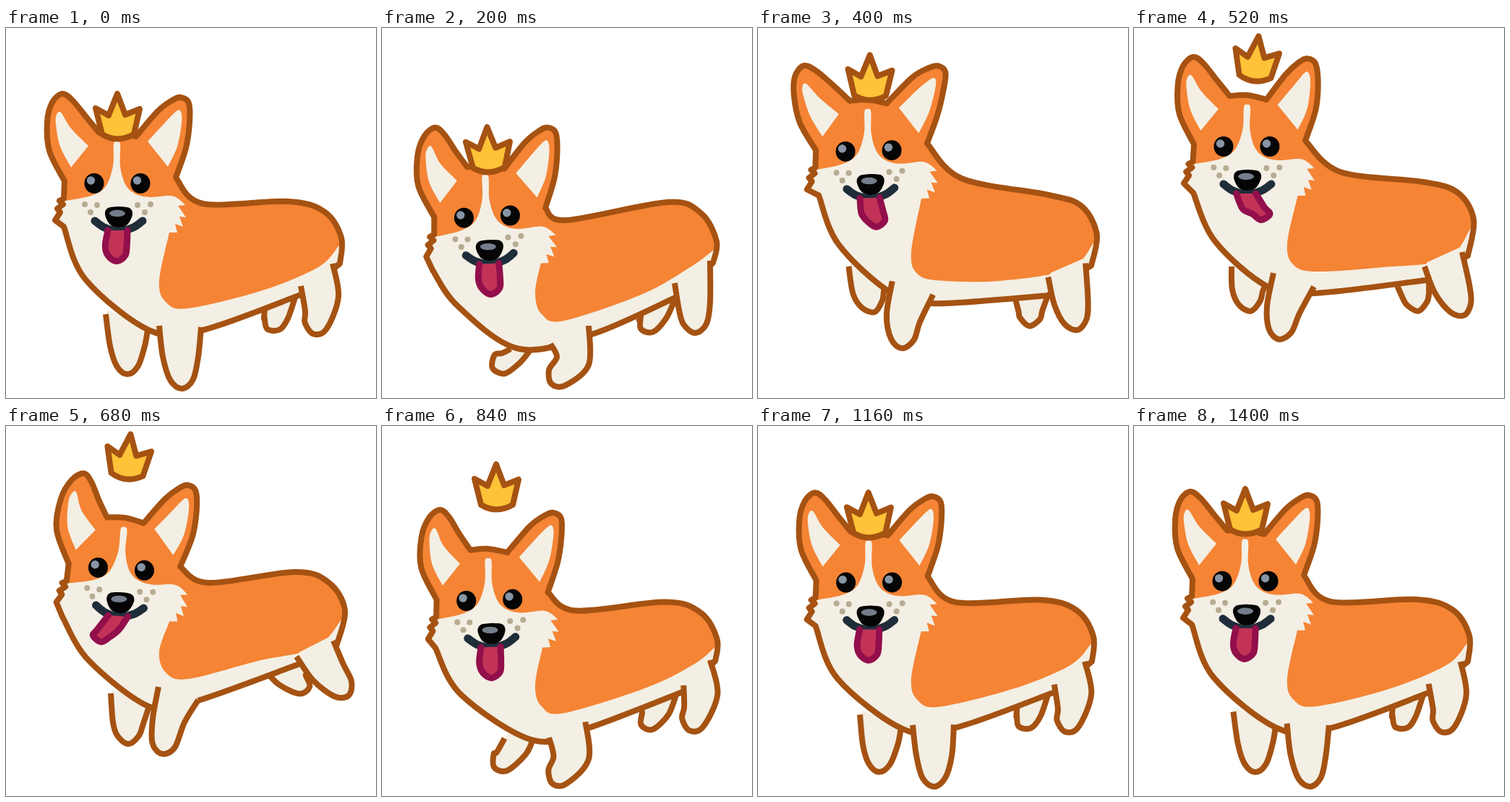
Write an HTML page with a canvas that moves like this. It is 512 px wide and 512 px high and loops after 1.44 s.

```html
<!DOCTYPE html>
<html lang="en">
<head>
<meta charset="utf-8">
<title>Jumping corgi</title>
<style>
html, body { margin: 0; width: 100%; height: 100%; overflow: hidden; background: #fff; }
canvas { display: block; width: 100vw; height: 100vh; }
</style>
</head>
<body>
<canvas id="stage" width="512" height="512"></canvas>
<script>
const ctx = document.getElementById('stage').getContext('2d');
const LOOP = 1440, STEP = 40;
const BROWN = '#a55212', ORANGE = '#f58435', CREAM = '#f3efe4';

// Pose rows: rest, crouch, launch, rise, fall, recover.
const poses = {
  // nose x, nose y, slope, skew, left ear turn, right ear turn, tongue swing
  head: [
    [156, 261, 0, 0, 0, 0, -3],
    [149, 307, -.05, .035, .1, 0, 0],
    [154, 239, -.04, .03, -.14, .19, -4],
    [157, 210, 0, -.02, 0, -.08, 20],
    [158, 244, .06, -.075, .17, -.06, -22],
    [153, 276, -.025, .012, .13, .05, -2]],
  // neck, back, rump, tail, rear belly, front belly, chest, breast, throat, patch bottom
  body: [
    [272, 243, 390, 240, 464, 290, 462, 326, 408, 369, 272, 418, 200, 419, 110, 348, 80, 275, 388],
    [255, 266, 395, 241, 463, 295, 458, 325, 406, 373, 293, 423, 190, 444, 105, 385, 70, 335, 405],
    [275, 225, 400, 240, 467, 295, 460, 333, 400, 379, 250, 397, 185, 387, 110, 320, 82, 256, 367],
    [285, 199, 400, 213, 470, 265, 462, 315, 404, 349, 250, 367, 185, 358, 112, 295, 82, 228, 337],
    [280, 217, 400, 202, 469, 255, 458, 302, 404, 330, 262, 381, 200, 389, 115, 325, 78, 264, 350],
    [275, 250, 390, 245, 464, 295, 463, 325, 422, 365, 282, 415, 220, 430, 112, 365, 76, 292, 393]],
  // each leg: front top, front knee, foot centre, back knee, back top
  nearFront: [
    [212, 412, 217, 455, 243, 482, 266, 455, 270, 414],
    [233, 437, 242, 455, 246, 480, 286, 466, 286, 412],
    [193, 374, 189, 415, 209, 444, 235, 425, 249, 384],
    [193, 339, 184, 385, 203, 414, 229, 395, 249, 358],
    [211, 361, 203, 405, 219, 437, 247, 410, 266, 379],
    [230, 428, 235, 458, 246, 482, 286, 458, 279, 408]],
  farFront: [
    [138, 396, 144, 440, 168, 463, 192, 440, 196, 418],
    [178, 444, 166, 450, 167, 463, 190, 464, 205, 446],
    [132, 355, 137, 390, 158, 399, 176, 390, 178, 383],
    [135, 330, 136, 362, 159, 376, 178, 365, 182, 356],
    [145, 370, 148, 410, 169, 424, 190, 412, 198, 388],
    [165, 426, 155, 452, 168, 462, 203, 450, 210, 430]],
  nearHind: [
    [408, 357, 414, 392, 430, 407, 460, 372, 452, 326],
    [405, 353, 411, 390, 433, 405, 454, 380, 454, 322],
    [402, 352, 408, 390, 433, 409, 453, 385, 453, 331],
    [402, 330, 416, 366, 450, 382, 464, 355, 454, 310],
    [402, 319, 425, 352, 463, 360, 467, 330, 453, 297],
    [424, 362, 422, 388, 431, 406, 470, 366, 454, 325]],
  farHind: [
    [358, 388, 357, 402, 371, 405, 390, 402, 400, 373],
    [356, 398, 356, 405, 370, 407, 393, 402, 405, 376],
    [352, 386, 355, 402, 370, 407, 388, 402, 400, 376],
    [364, 356, 372, 374, 391, 377, 408, 368, 408, 350],
    [362, 342, 378, 358, 406, 356, 422, 350, 412, 330],
    [362, 396, 360, 404, 372, 405, 398, 398, 408, 370]]
};

const mix = (a, b, k) => a.map((v, i) => v + (b[i] - v) * k);

function poseKeys([rest, crouch, launch, rise, fall, recover]) {
  return [[0, rest], [200, crouch], [320, launch], [520, rise], [680, fall],
    [840, mix(recover, crouch, .35)], [1000, recover], [1200, mix(recover, rest, 1.05)], [LOOP, rest]];
}

const tracks = {};
for (const part in poses) tracks[part] = poseKeys(poses[part]);

// Base x, base y, tilt in degrees
tracks.crown = [
  [0, [154, 152, 0]], [200, [147, 198, -1.5]], [320, [147, 130, -2]], [520, [166, 72, 6]],
  [600, [167, 69, 7]], [680, [166, 72, 6]], [840, [158, 114, 0]], [1000, [151, 162, -3.5]],
  [1200, [154, 150, 0]], [1400, [154, 148, 0]], [LOOP, [154, 152, 0]]];

// Cubic Hermite interpolation with weighted tangents; still at both ends
function sample(keys, t) {
  let n = 0;
  while (n < keys.length - 2 && t >= keys[n + 1][0]) n++;
  const [t0, a] = keys[n], [t1, b] = keys[n + 1], span = t1 - t0, u = (t - t0) / span;
  const slope = (k, i) => {
    if (k === 0 || k === keys.length - 1) return 0;
    const [[tp, p], [tc, c], [tn, q]] = [keys[k - 1], keys[k], keys[k + 1]];
    const d0 = tc - tp, d1 = tn - tc;
    return ((c[i] - p[i]) / d0 * d1 + (q[i] - c[i]) / d1 * d0) / (d0 + d1);
  };
  const u2 = u * u, u3 = u2 * u;
  return a.map((v, i) => v + (b[i] - v) * (3 * u2 - 2 * u3) +
    span * ((u3 - 2 * u2 + u) * slope(n, i) + (u3 - u2) * slope(n + 1, i)));
}

const pairs = list => {
  const out = [];
  for (let i = 0; i + 1 < list.length; i += 2) out.push([list[i], list[i + 1]]);
  return out;
};

function curve(path, pts) {
  path.lineTo(...pts[0]);
  for (let i = 0; i < pts.length - 1; i++) {
    const p = pts[i - 1] || pts[i], a = pts[i], b = pts[i + 1], q = pts[i + 2] || b;
    path.bezierCurveTo(a[0] + (b[0] - p[0]) / 6, a[1] + (b[1] - p[1]) / 6,
      b[0] - (q[0] - a[0]) / 6, b[1] - (q[1] - a[1]) / 6, ...b);
  }
}

const lines = (path, pts) => pts.forEach(p => path.lineTo(...p));

function paint(path, fill, stroke, width = 8) {
  if (fill) { ctx.fillStyle = fill; ctx.fill(path); }
  if (stroke) { ctx.strokeStyle = stroke; ctx.lineWidth = width; ctx.stroke(path); }
}

function oval([x, y], rx, ry, color) {
  const path = new Path2D();
  path.ellipse(x, y, rx, ry, 0, 0, 7);
  paint(path, color);
}

function drawLeg(row, radius) {
  const [a, m1, f, m2, b] = pairs(row);
  const dx = f[0] - (m1[0] + m2[0]) / 2, dy = f[1] - (m1[1] + m2[1]) / 2;
  const len = Math.hypot(dx, dy) || 1, ux = dx / len * radius, uy = dy / len * radius;
  const at = (side, down) => [f[0] + side * uy + down * ux, f[1] - side * ux + down * uy];
  const pts = [a, m1, at(-.92, .3), at(0, 1), at(.92, .3), m2, b];
  const fill = new Path2D(), edge = new Path2D();
  curve(fill, pts);
  lines(fill, [[b[0] - 4, b[1] - 6], [a[0] + 4, a[1] - 6]]);
  curve(edge, pts);
  ctx.lineCap = 'butt';
  paint(fill, CREAM);
  paint(edge, null, BROWN);
  ctx.lineCap = 'round';
}

function drawCrown([x, y, tilt]) {
  ctx.save();
  ctx.translate(x, y);
  ctx.rotate(tilt * Math.PI / 180);
  const path = new Path2D();
  lines(path, pairs([-21, -5, -30, -41, -12, -31, 0, -61, 11, -32, 31, -40, 23, -5]));
  path.quadraticCurveTo(0, 8, -21, -5);
  path.closePath();
  paint(path, '#fec338', BROWN);
  ctx.restore();
}

function drawFace(place, swing) {
  for (const x of [-34, 30]) {
    oval(place(x, -46), 13.5, 14, '#050505');
    oval(place(x - 4.5, -50), 5.7, 5.7, '#8795a6');
  }
  for (const [x, y] of pairs([-47, -17, -30, -16, -39, -6, 26, -16, 44, -17, 36, -6]))
    oval(place(x, y), 4, 4, '#b7ab92');

  const at = list => pairs(list).map(p => place(...p));
  const mouth = new Path2D();
  curve(mouth, at([-33, 6, -20, 15, 0, 20, 20, 15, 33, 6]));
  paint(mouth, null, '#1f2d3a', 11);

  const tongue = new Path2D(), mid = swing * .55;
  const drop = 60 - Math.abs(swing + 2) * .3;
  curve(tongue, at([-15, 19, mid - 17, 40, swing - 12, drop - 6, swing, drop + 2,
    swing + 12, drop - 6, mid + 13, 38, 12, 19]));
  paint(tongue, '#c23357', '#920f4b', 9);

  const nose = new Path2D();
  curve(nose, at([0, -14, 15, -12, 19, -3, 12, 11, 0, 15, -12, 11, -19, -3, -15, -12, 0, -14]));
  paint(nose, '#050505');
  oval(place(-2, -4.5), 11, 4.7, '#747d8b');
}

function drawDog(t) {
  const [nx, ny, slope, skew, turnL, turnR, swing] = sample(tracks.head, t);
  const body = sample(tracks.body, t), patchY = body[18];
  const [neck, back, rump, tail, rearBelly, frontBelly, chest, breast, throat] = pairs(body);

  const place = (x, y) => [nx + x + skew * y, ny + y + slope * x];
  const head = list => pairs(list).map(p => place(...p));
  // Ears bend about their roots, more towards the tip
  const ear = (side, list) => pairs(list).map(([x, y]) => {
    const dx = x - side * 51, dy = y + 82;
    const bend = (side < 0 ? turnL : turnR) * Math.min(1, Math.hypot(dx, dy) / 88);
    return place(x - dy * bend, y + dx * bend);
  });

  drawLeg(sample(tracks.farFront, t), 16);
  drawLeg(sample(tracks.farHind, t), 15);

  const rootL = place(-75, -49), crownL = place(-27, -116);
  const crownR = place(24, -111), rootR = place(79, -54);
  const shoulder = [back[0] + .68 * (rump[0] - back[0]), back[1] + .28 * (rump[1] - back[1])];

  const outline = new Path2D();
  curve(outline, [rootL, ...ear(-1, [-96, -91, -99, -131, -92, -158, -78, -170, -64, -161, -46, -139]), crownL]);
  curve(outline, [crownL, place(-2, -117), crownR]);
  curve(outline, [crownR, ...ear(1, [54, -146, 74, -161, 86, -165, 97, -157, 98, -130, 93, -95]), rootR]);
  curve(outline, [rootR, neck, back, shoulder, rump, tail]);
  curve(outline, [rearBelly, frontBelly, chest, breast, throat]);
  lines(outline, head([-88, 5, -81, -6, -85, -11, -77, -17, -82, -22, -76, -25]));
  outline.closePath();

  const patch = new Path2D();
  curve(patch, head([-90, -20, -74, -22, -38, -29, -18, -42, -8, -70, -7, -100, -3, -104, 2, -100,
    2, -70, 9, -45, 22, -32, 42, -27, 70, -29, 82, -25, 92, -16]));
  lines(patch, head([82, -15, 93, 1, 84, 0, 89, 14, 78, 10, 81, 22]));
  const belly = mix(frontBelly, rearBelly, .6);
  curve(patch, [place(70, 22), [212, patchY - 38], [221, patchY - 9], [252, patchY],
    [belly[0], belly[1] - 25], [tail[0] - 30, tail[1] + 5], [rump[0] - 4, rump[1] + 12]]);
  lines(patch, [[520, rump[1] + 5], [520, 520], [0, 520]]);
  patch.closePath();

  paint(outline, ORANGE);
  ctx.save();
  ctx.clip(outline);
  paint(patch, CREAM);
  ctx.restore();

  const inner = new Path2D();
  const innerEar = (side, start, list) => {
    inner.moveTo(...ear(side, start)[0]);
    curve(inner, ear(side, list));
    inner.closePath();
  };
  innerEar(-1, [-42, -98], [-66, -68, -81, -97, -87, -128, -86, -141, -80, -144, -66, -122, -42, -98]);
  innerEar(1, [40, -104], [40, -104, 63, -129, 80, -146, 86, -145, 87, -130, 81, -97, 68, -69]);
  paint(inner, CREAM);
  paint(outline, null, BROWN);

  drawLeg(sample(tracks.nearHind, t), 17);
  drawLeg(sample(tracks.nearFront, t), 17);
  drawFace(place, swing);
  drawCrown(sample(tracks.crown, t));
}

function frame(now) {
  ctx.fillStyle = '#fff';
  ctx.fillRect(0, 0, 512, 512);
  ctx.lineJoin = ctx.lineCap = 'round';
  drawDog(Math.floor(now % LOOP / STEP) * STEP);
  requestAnimationFrame(frame);
}
frame(performance.now());
</script>
</body>
</html>
```
